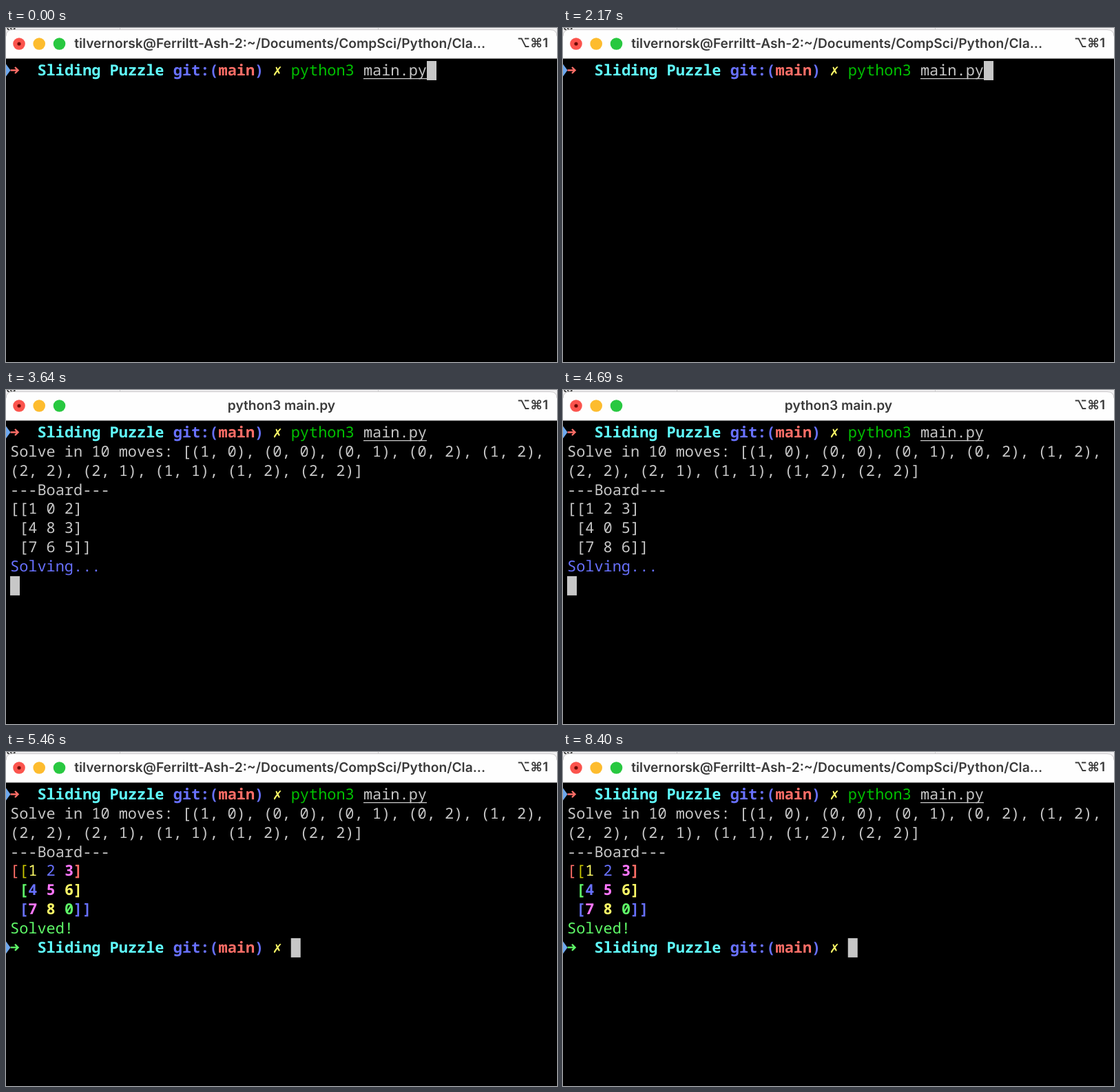
Recreate the animation shown at these times as an HTML page. Size 800 by 486 pixels, loop 8.47 s.

```html
<!DOCTYPE html>
<html lang="en">
<head>
<meta charset="utf-8">
<title>Sliding Puzzle</title>
<style>
  html, body { margin: 0; width: 100%; height: 100%; overflow: hidden; background: #000; }
  svg { display: block; width: 800px; height: 486px; }
  text { white-space: pre; text-rendering: geometricPrecision; }
  .bar { font: 600 19.2px Inter, "Open Sans", sans-serif; fill: #3a3a3a; }
  .keys { font: 600 18.6px Inter, "DejaVu Sans", sans-serif; fill: #3a3a3a; }
  .behind { font: 500 16px Inter, sans-serif; fill: #333; }
  #term { font: 400 21.92px "Noto Sans Mono", "DejaVu Sans Mono", monospace; }
  #term .b { font-weight: 700; }
</style>
</head>
<body>
<svg viewBox="0 0 800 486">
  <rect width="800" height="486" fill="#000"/>
  <rect width="800" height="20" fill="#f1f0f1"/>
  <text class="behind" x="0" y="3">ta</text>
  <path d="M165.500 0V3M540.500 0V3" stroke="#d2d0d2"/>
  <path d="M0 44.500V12Q0 2.500 10 2.500H790Q800 2.500 800 12V44.500Z" fill="#fefefe"/>
  <path d="M0 12Q0 2.500 10 2.500H790Q800 2.500 800 12" fill="none" stroke="#c9c7c9"/>
  <circle cx="19" cy="23" r="8.800" fill="#fb544d"/>
  <circle cx="19" cy="23" r="2.600" fill="#6e0a06"/>
  <circle cx="48.200" cy="23" r="8.800" fill="#fdbc2e"/>
  <circle cx="77.500" cy="23" r="8.800" fill="#28c840"/>
  <text id="title" class="bar" y="29"></text>
  <text class="keys" x="787" y="28" text-anchor="end">⌥⌘1</text>
  <g id="term"></g>
</svg>
<script>
const LOOP = 8470, RUN = 2240, OUTPUT = 2800, STEP = 225;
const LEFT = 6, COL = 13.152, ROW = 27.86, TOP = 48, BASE = 21;
const C = {
  text: '#c7c7c7', red: '#ff6e67', green: '#5ffa68', leaf: '#00c200', yellow: '#fffc67',
  olive: '#c7c400', blue: '#6871ff', pink: '#ff77ff', cyan: '#60fdff', mark: '#6ea8ee'
};
const MOVES = [[1, 0], [0, 0], [0, 1], [0, 2], [1, 2], [2, 2], [2, 1], [1, 1], [1, 2], [2, 2]];
const START = [[4, 1, 2], [7, 8, 3], [0, 6, 5]];
const DONE = OUTPUT + STEP * MOVES.length;

const term = document.getElementById('term');
const title = document.getElementById('title');

function add(tag, attrs, text = '') {
  const el = document.createElementNS('http://www.w3.org/2000/svg', tag);
  for (const k in attrs) el.setAttribute(k, attrs[k]);
  el.textContent = text;
  term.append(el);
}

// Writes runs of [text, colour, bold] on the character grid; returns the end column.
function write(row, runs, col = 0) {
  for (const [text, fill, bold] of runs) {
    add('text', { x: LEFT + col * COL, y: TOP + BASE + row * ROW, fill, class: bold ? 'b' : '' }, text);
    col += text.length;
  }
  return col;
}

function cursor(row, col) {
  add('rect', { x: LEFT + col * COL, y: TOP + row * ROW, width: 14, height: 28, fill: C.text });
}

function prompt(row, arrow) {
  const y = TOP + 13.5 + row * ROW;
  add('path', { d: `M0 ${y - 9}L6.500 ${y}L0 ${y + 9}Z`, fill: C.mark });
  add('path', { d: `M6.500 ${y}H17M13 ${y - 4.5}L17.500 ${y}L13 ${y + 4.5}`, fill: 'none', stroke: arrow, 'stroke-width': 2.4 });
  return write(row, [['Sliding Puzzle ', C.cyan, 1], ['git:(', C.blue, 1], ['main', C.red, 1],
    [') ', C.blue, 1], ['✗', C.yellow, 1], [' ']], 3);
}

function boardAfter(count) {
  const board = START.map(r => [...r]);
  let [r, c] = [2, 0];
  for (const [y, x] of MOVES.slice(0, count)) {
    board[r][c] = board[y][x];
    board[y][x] = 0;
    [r, c] = [y, x];
  }
  return board;
}

function solvedBoard() {
  const { red, olive, yellow, blue, pink, green } = C;
  write(4, [['[', red], ['[', olive], ['1 ', yellow], ['2 ', blue], ['3', pink, 1], [']', red, 1]]);
  write(5, [['[', green, 1], ['4 ', blue, 1], ['5 ', pink, 1], ['6', yellow, 1], [']', yellow, 1]], 1);
  write(6, [['[', blue, 1], ['7 ', pink, 1], ['8 ', yellow, 1], ['0', green, 1], [']]', blue, 1]], 1);
}

function setTitle(text, x, anchor) {
  title.textContent = text;
  title.setAttribute('x', x);
  title.setAttribute('text-anchor', anchor);
}

function draw(phase) {
  term.replaceChildren();
  if (phase > 0 && phase < 12) setTitle('python3 main.py', 400, 'middle');
  else setTitle('tilvernorsk@Ferriltt-Ash-2:~/Documents/CompSci/Python/Cla...', 696, 'end');

  const at = prompt(0, C.red);
  const end = write(0, [['python3 ', C.leaf], ['main.py', C.text]], at);
  add('rect', { x: LEFT + (at + 8) * COL, y: 73, width: 7 * COL, height: 1.3, fill: C.text });
  if (phase === 0) return cursor(0, end);
  if (phase === 1) return cursor(1, 0);

  const pairs = MOVES.map(m => `(${m.join(', ')})`);
  write(1, [[`Solve in 10 moves: [${pairs.slice(0, 5).join(', ')},`, C.text]]);
  write(2, [[`${pairs.slice(5).join(', ')}]`, C.text]]);
  write(3, [['---Board---', C.text]]);
  if (phase === 12) {
    solvedBoard();
    write(7, [['Solved!', C.green]]);
    cursor(8, prompt(8, C.green));
  } else {
    boardAfter(phase - 2).forEach((r, i) =>
      write(4 + i, [[`${i ? ' ' : '['}[${r.join(' ')}]${i === 2 ? ']' : ''}`, C.text]]));
    write(7, [['Solving...', C.blue]]);
    cursor(8, 0);
  }
}

// 0: typed command, 1: waiting, 2 to 11: board between moves, 12: solved.
function phaseAt(t) {
  if (t < RUN) return 0;
  if (t < OUTPUT) return 1;
  return t < DONE ? 2 + Math.floor((t - OUTPUT) / STEP) : 12;
}

let shown = -1;
const began = performance.now();
function tick() {
  const phase = phaseAt((performance.now() - began) % LOOP);
  if (phase !== shown) draw(shown = phase);
  requestAnimationFrame(tick);
}
tick();
</script>
</body>
</html>
```
